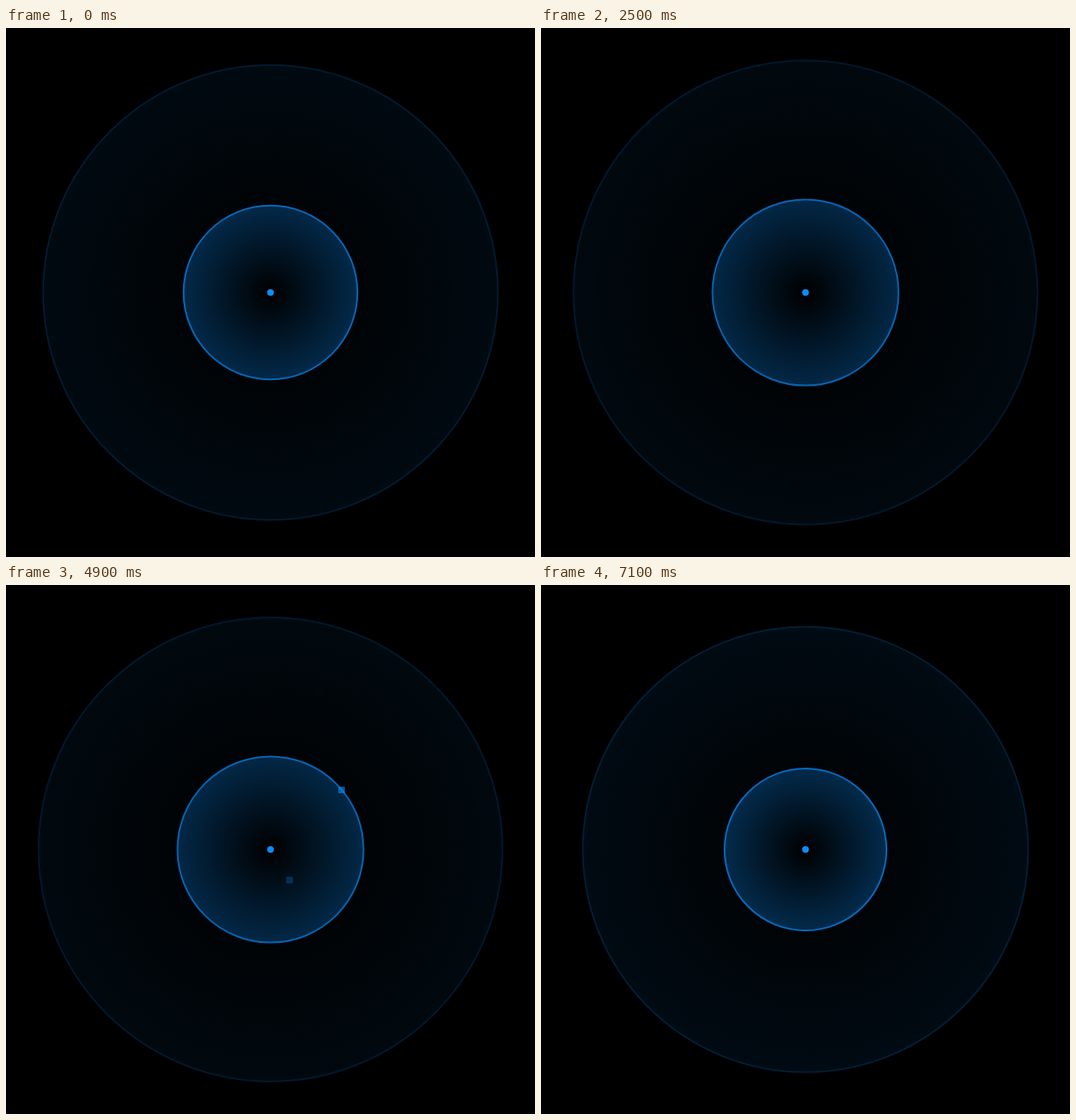
An HTML page with a canvas that plays this animation: 640 by 640 pixels, repeating every 7200 ms.

```html
<!DOCTYPE html>
<html lang="en">
<head>
<meta charset="utf-8">
<title>Pulse</title>
<style>
html, body { margin: 0; width: 100%; height: 100%; overflow: hidden; background: #000; }
canvas { display: block; width: 100vw; height: 100vh; }
</style>
</head>
<body>
<canvas id="stage" width="640" height="640"></canvas>
<script>
const ctx = document.getElementById('stage').getContext('2d');
const SIZE = 640, CENTER = SIZE / 2, TURN = Math.PI * 2;
const LOOP = 7200, STEP = 100, PULSE = 2400;
const RING_LIFE = 2 * PULSE, RING_BIRTH = -1745, RING_REACH = 310, RING_EASE = 0.2;
const BLIP_SIZE = 8, BLIP_LEAD = 5, BLIP_RISE = 450, BLIP_FADE = 900;
const blue = alpha => `rgba(10,142,252,${alpha})`;

// Echo positions; every ring wakes three of them
const echoes = [
  [391, 406], [461, 409], [170, 431],
  [193, 393], [212, 462], [379, 130],
  [343, 357], [406, 248], [395, 465]
];

// Gentle ease in and out from the centre to full reach
function radiusAt(time) {
  const u = (time - RING_BIRTH) / RING_LIFE;
  if (u <= 0 || u >= 1) return 0;
  return RING_REACH * (u - RING_EASE * Math.sin(TURN * u) / TURN);
}

function timeOfRadius(radius) {
  let time = RING_BIRTH;
  while (radiusAt(time) < radius) time += 5;
  return time;
}

const blips = echoes.map(([x, y], i) => {
  const distance = Math.hypot(x - CENTER, y - CENTER);
  return { x, y, hit: timeOfRadius(distance - BLIP_LEAD) + Math.floor(i / 3) * PULSE };
});

function disc(radius) {
  ctx.beginPath();
  ctx.arc(CENTER, CENTER, radius, 0, TURN);
}

function drawRing(radius) {
  if (radius <= 0) return;
  const opacity = 1 - radius / 330;
  const fill = ctx.createRadialGradient(CENTER, CENTER, 0, CENTER, CENTER, radius);
  fill.addColorStop(0, blue(0));
  fill.addColorStop(1, blue(0.4 * opacity));
  disc(radius);
  ctx.fillStyle = fill;
  ctx.fill();
  ctx.lineWidth = 2;
  ctx.strokeStyle = blue(opacity);
  ctx.stroke();
}

function drawBlip({ x, y, hit }, time) {
  const age = (time - hit + LOOP) % LOOP;
  const alpha = 1 - Math.abs(age - BLIP_RISE) / BLIP_FADE;
  if (alpha <= 0) return;
  ctx.fillStyle = blue(alpha);
  ctx.fillRect(x - BLIP_SIZE / 2, y - BLIP_SIZE / 2, BLIP_SIZE, BLIP_SIZE);
}

function draw(time) {
  ctx.fillStyle = '#000';
  ctx.fillRect(0, 0, SIZE, SIZE);
  blips.forEach(blip => drawBlip(blip, time));
  const phase = time % PULSE;
  for (const shift of [PULSE, 0, -PULSE]) drawRing(radiusAt(phase + shift));
  disc(4);
  ctx.fillStyle = blue(1);
  ctx.fill();
}

const start = performance.now();
function tick() {
  const time = (performance.now() - start) % LOOP;
  draw(Math.floor(time / STEP) * STEP);
  requestAnimationFrame(tick);
}
tick();
</script>
</body>
</html>
```
